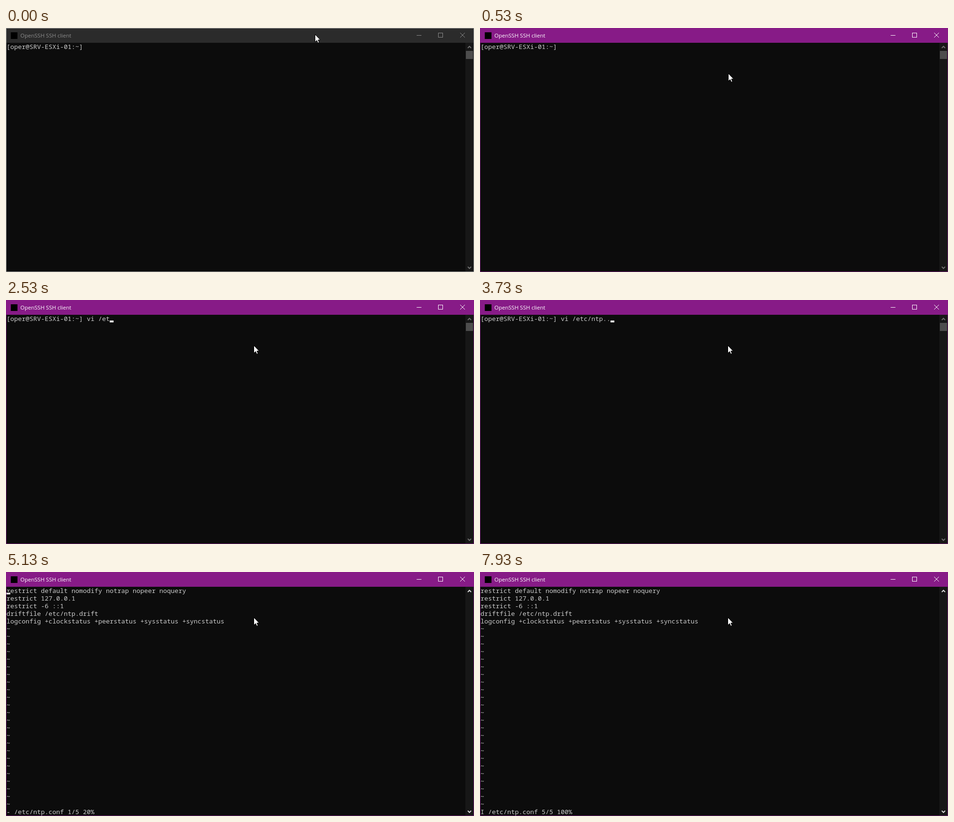
Animation, 979 px wide and 512 px high, one loop 8000 ms. Source, as an HTML page with a canvas:

```html
<!DOCTYPE html>
<html lang="en">
<head>
<meta charset="utf-8">
<title>SSH client</title>
<style>
html, body { margin: 0; width: 979px; height: 512px; overflow: hidden; background: #0c0c0c; }
canvas { display: block; }
</style>
</head>
<body>
<canvas id="stage" width="979" height="512"></canvas>
<script>
const ctx = document.getElementById('stage').getContext('2d');
const LOOP = 8000, CELL_W = 8, CELL_H = 16, LEFT = 1, TOP = 31;
const FOCUS = 530, EDITOR = 5130;
const PROMPT = '[oper@SRV-ESXi-01:~] ';
const FILE = [
  'restrict default nomodify notrap nopeer noquery',
  'restrict 127.0.0.1',
  'restrict -6 ::1',
  'driftfile /etc/ntp.drift',
  'logconfig +clockstatus +peerstatus +sysstatus +syncstatus'
];

// time, x, y
const pointer = [[0, 646, 13], [130, 622, 32], [200, 549, 83], [270, 519, 95], [930, 518, 95]];

// time, typed text, caret visible
const typing = [
  [0, '', 0], [1000, '', 1], [1530, '', 0], [1730, 'v', 1], [1870, 'vi', 1], [2000, 'vi ', 1],
  [2330, 'vi /', 1], [2470, 'vi /e', 1], [2530, 'vi /et', 1], [2670, 'vi /etc/', 1],
  [2930, 'vi /etc/n', 1], [3070, 'vi /etc/nt', 1], [3200, 'vi /etc/ntp', 1],
  [3400, 'vi /etc/ntp.', 1], [3730, 'vi /etc/ntp..', 1], [4130, 'vi /etc/ntp.', 1],
  [4200, 'vi /etc/ntp.c', 1], [4530, 'vi /etc/ntp.conf ', 1]
];

// time, caret row, caret visible, mode
const editing = [
  [5130, 0, 1, '-'], [5270, 0, 0, '-'], [5800, 0, 1, '-'], [6000, 1, 1, '-'], [6130, 2, 1, '-'],
  [6270, 3, 1, '-'], [6330, 3, 0, '-'], [6400, 4, 1, '-'], [6870, 4, 0, '-'], [6930, 4, 1, '-'],
  [7400, 4, 0, '-'], [7800, 4, 1, 'I'], [7930, 4, 0, 'I']
];

const arrow = new Path2D('M.5 .5V16.5L4.2 13L6.7 18.5L9.2 17.4L6.8 12H11.5Z');
const at = (steps, t) => steps.findLast(s => s[0] <= t);

function rect(x, y, w, h, color) {
  ctx.fillStyle = color;
  ctx.fillRect(x, y, w, h);
}

function line(color, width, ...points) {
  ctx.strokeStyle = color;
  ctx.lineWidth = width;
  ctx.beginPath();
  points.forEach(([x, y]) => ctx.lineTo(x, y));
  ctx.stroke();
}

function print(text, row) {
  ctx.font = '13.3333px "Noto Sans Mono", "Liberation Mono", monospace';
  ctx.fillStyle = '#cccccc';
  ctx.fillText(text, LEFT, TOP + row * CELL_H + 13);
}

function caret(col, row) {
  ctx.globalCompositeOperation = 'difference';
  rect(LEFT + col * CELL_W, TOP + row * CELL_H + 12, CELL_W, 4, '#fff');
  ctx.globalCompositeOperation = 'source-over';
}

function drawWindow(active, scrollable) {
  const ink = active ? '#ffffff' : '#8c8c8c';
  rect(0, 0, 979, 512, active ? '#701c72' : '#9a9a9a');
  rect(1, 1, 977, 510, '#0c0c0c');
  rect(active ? 0 : 1, active ? 0 : 1, active ? 979 : 977, active ? 31 : 30, active ? '#871b87' : '#2b2b2b');
  rect(10, 9, 14, 14, '#000');

  ctx.font = '11.5px "Open Sans", "Noto Sans", sans-serif';
  ctx.fillStyle = ink;
  ctx.fillText('OpenSSH SSH client', 30, 20);
  line(ink, 1, [859, 15.5], [869, 15.5]);
  ctx.strokeRect(904.5, 10.5, 9, 9);
  line(ink, 1, [950, 10], [960, 20]);
  line(ink, 1, [960, 10], [950, 20]);

  rect(961, 31, 17, 480, '#171717');
  if (scrollable) rect(962, 48, 15, 17, '#4d4d4d');
  const tick = scrollable ? '#707070' : '#dddddd';
  line(tick, 2, [966, 42], [969.5, 38.5], [973, 42]);
  line(tick, 2, [966, 501], [969.5, 504.5], [973, 501]);
}

function drawShell(t) {
  const [, text, on] = at(typing, t);
  print(PROMPT + text, 0);
  if (on) caret(PROMPT.length + text.length, 0);
}

function drawEditor(t) {
  const [, row, on, mode] = at(editing, t);
  for (let r = 0; r < 29; r++) print(FILE[r] || '~', r);
  print(`${mode} /etc/ntp.conf ${row + 1}/5 ${(row + 1) * 20}%`, 29);
  if (on) caret(0, row);
}

function drawPointer(t) {
  const [, x, y] = at(pointer, t);
  ctx.save();
  ctx.translate(x, y);
  ctx.fillStyle = '#fff';
  ctx.fill(arrow);
  ctx.strokeStyle = '#000';
  ctx.lineWidth = 1;
  ctx.stroke(arrow);
  ctx.restore();
}

function frame() {
  const t = performance.now() % LOOP;
  drawWindow(t >= FOCUS, t < EDITOR);
  (t < EDITOR ? drawShell : drawEditor)(t);
  drawPointer(t);
  requestAnimationFrame(frame);
}
frame();
</script>
</body>
</html>
```
